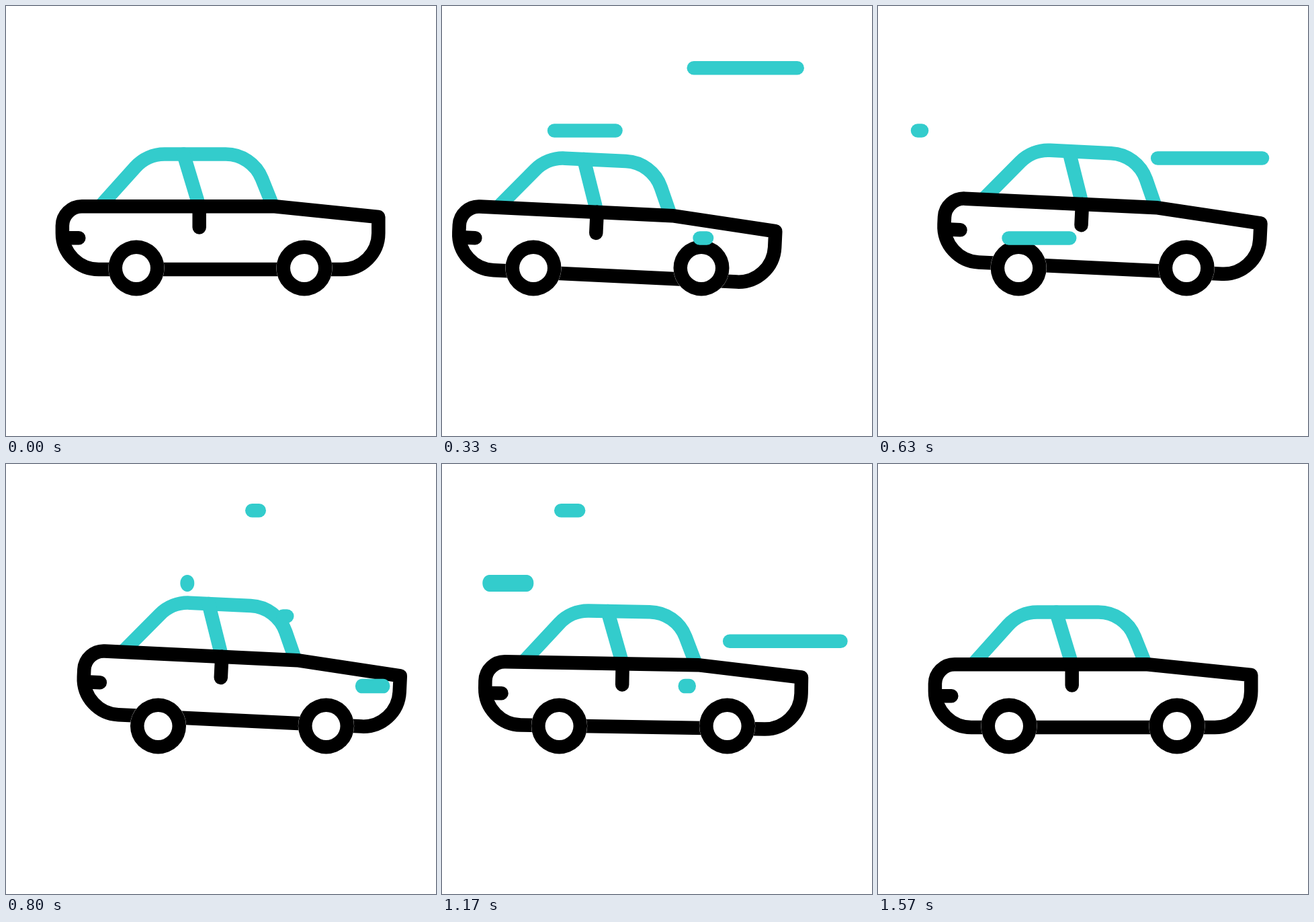
These frames come from a looping animation (640x640 px, 1.67 s). An HTML page with a canvas:

```html
<!DOCTYPE html>
<html lang="en">
<head>
<meta charset="utf-8">
<title>Car</title>
<style>
  html, body { margin: 0; width: 100%; height: 100%; overflow: hidden; background: #fff; }
  canvas { display: block; width: 100vmin; height: 100vmin; }
</style>
</head>
<body>
<canvas id="stage" width="640" height="640"></canvas>
<script>
const ctx = document.getElementById('stage').getContext('2d');
const LOOP = 1670, LAST_STEP = 47;
const TEAL = '#33cccc', BLACK = '#000', WHITE = '#fff';
const STROKE = 20.5;
const STREAK_LENGTH = 199.5;
const PIVOT = { x: 110, y: 325 };

const roof = new Path2D('M142 296L192.5 239.9A58.5 58.5 0 0 1 236 220.5H327' +
  'A58 58 0 0 1 380.8 256.8L396.5 296');
const pillar = new Path2D('M264.2 220.5L287 296');
const body = new Path2D('M113 298.3H400L554.3 314V338A54 54 0 0 1 500.3 392H138' +
  'A54 54 0 0 1 83.9 338V327A29 29 0 0 1 113 298.3Z');
const details = new Path2D('M92 345.3H108.3M287.7 298.3V329.5');

// Smooth 0 to 1 while time passes from start to end
function ease(time, start, end) {
  const u = Math.min(1, Math.max(0, (time - start) / (end - start)));
  return u * u * (3 - 2 * u);
}

function stroke(path, color, cap = 'round') {
  ctx.strokeStyle = color;
  ctx.lineCap = cap;
  ctx.stroke(path);
}

function disc(x, y, radius, color) {
  ctx.fillStyle = color;
  ctx.beginPath();
  ctx.arc(x, y, radius, 0, 2 * Math.PI);
  ctx.fill();
}

function drawWheel(x) {
  disc(x, 390, 41.7, WHITE);
  disc(x, 390, 41.5, BLACK);
  disc(x, 390, 21, WHITE);
}

function drawCar(time) {
  // Roll back, surge ahead, fall back, settle
  const x = -58 * ease(time, 0, 10) + 90.5 * ease(time, 10, 22.5)
    - 53 * ease(time, 24.2, 36) + 21.5 * ease(time, 36, 47);
  const lift = 20.3 * (ease(time, 11.5, 25) - ease(time, 25, 39));
  const tilt = 2.74 * (ease(time, 0, 10) - ease(time, 29, 39));

  ctx.save();
  ctx.translate(PIVOT.x + x, PIVOT.y - lift);
  ctx.rotate(tilt * Math.PI / 180);
  ctx.translate(-PIVOT.x, -PIVOT.y);
  stroke(roof, TEAL, 'butt');
  stroke(pillar, TEAL);
  stroke(body, BLACK);
  stroke(details, BLACK);
  ctx.restore();

  drawWheel(194 + x);
  drawWheel(444 + x);
}

// A line that grows leftwards, then shrinks after its own head
function drawStreak(age, left, y, scaleY = 1) {
  const head = STREAK_LENGTH * (1 - ease(age, 0, 9));
  const tail = STREAK_LENGTH * (1 - ease(age, 5.9, 14.1));
  if (tail - head < 0.01) return;
  ctx.save();
  ctx.translate(left + STROKE / 2, y);
  ctx.scale(1, scaleY);
  stroke(new Path2D(`M${head} 0H${tail}`), TEAL);
  ctx.restore();
}

function drawWind(time) {
  const first = time - 3.75;
  drawStreak(first, 320, 92.2);
  drawStreak(first - 2, 48.8, 185.4);
  drawStreak(first - 5, 184.3, 345.4);
  drawStreak(first - 7, 402, 226.4);

  const second = first - 18;
  drawStreak(second, 351.5, 330.5, 1.06);
  drawStreak(second - 1, 167, 69.2);
  drawStreak(second - 2, 60.3, 177.4, 1.22);
  drawStreak(second - 6, 398.2, 263.8);
}

function render(now) {
  // 30 steps per second, each starting on a whole 10 ms
  const time = Math.min(LAST_STEP, Math.floor((now % LOOP) * 0.03 + 0.101));
  ctx.fillStyle = WHITE;
  ctx.fillRect(0, 0, 640, 640);
  ctx.lineWidth = STROKE;
  ctx.lineJoin = 'round';
  drawCar(time);
  drawWind(time);
}

let origin;
function tick(now) {
  origin ??= now;
  render(now - origin);
  requestAnimationFrame(tick);
}
render(0);
requestAnimationFrame(tick);
</script>
</body>
</html>
```
